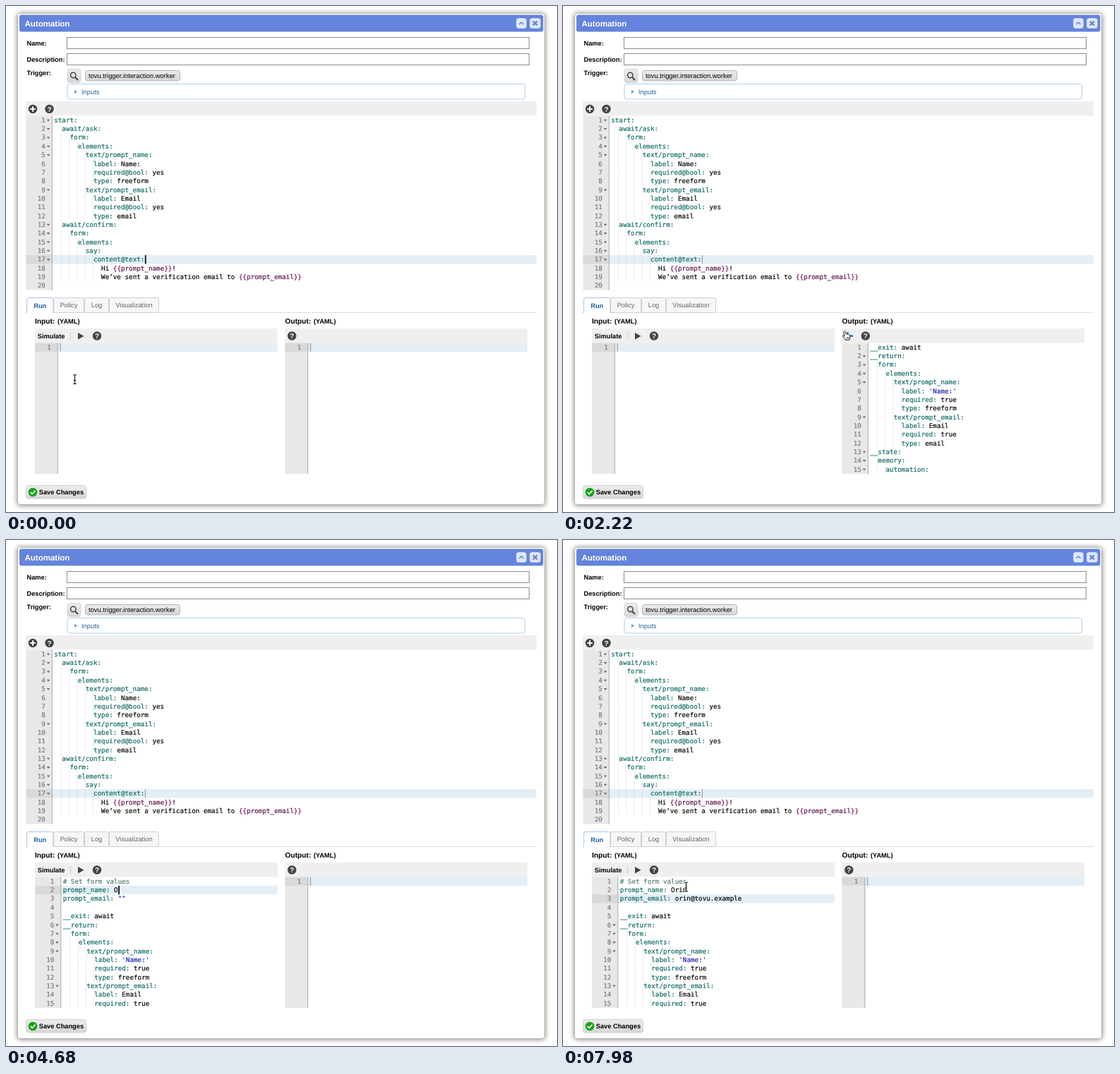
Write an HTML page that moves like this. It is 781 px wide and 717 px high and loops after 8000 ms.

```html
<!DOCTYPE html>
<html lang="en">
<head>
<meta charset="utf-8">
<title>Automation</title>
<style>
  html, body { margin: 0; width: 100%; height: 100%; overflow: hidden; background: #fff; }
  svg { display: block; width: 781px; height: 717px; }
  text { font: 9.4px "Liberation Sans", Arial, sans-serif; text-rendering: geometricPrecision; white-space: pre; }
  .b { font-weight: bold; font-size: 9.25px; }
  .code { font: 9.26px "DejaVu Sans Mono", monospace; }
  .code, .code tspan { fill: currentColor; stroke: currentColor; stroke-width: .16px; }
  .num { color: #777; text-anchor: end; }
  .key { color: #0b6962; }
  .str { color: #1a1ab0; }
  .brace { color: #7d1060; }
  .var { color: #5a0f48; }
  .note { color: #4c7f6c; }
</style>
</head>
<body>
<svg id="stage" viewBox="0 0 781 717">
  <defs>
    <filter id="shadow" x="-5%" y="-5%" width="110%" height="110%"><feGaussianBlur stdDeviation="3.6"/></filter>
    <linearGradient id="button" x2="0" y2="1"><stop stop-color="#ececec"/><stop offset="1" stop-color="#d6d6d6"/></linearGradient>
  </defs>
  <g id="chrome"></g>
  <g id="live"></g>
</svg>
<script>
const LOOP = 8000, CHAR = 5.575, ROW = 12.34;
const NAME = 'Orin', EMAIL = 'orin@tovu.example';
const INK = '#444', BLUE = '#1f6fd0';

const FORM = `form:
  elements:
    text/prompt_name:
      label: 'Name:'
      required: true
      type: freeform
    text/prompt_email:
      label: Email
      required: true
      type: email`.split('\n').map(line => '  ' + line);

const SCRIPT = `start:
  await/ask:
    form:
      elements:
        text/prompt_name:
          label: Name:
          required@bool: yes
          type: freeform
        text/prompt_email:
          label: Email
          required@bool: yes
          type: email
  await/confirm:
    form:
      elements:
        say:
          content@text:
            Hi {{prompt_name}}!
            We’ve sent a verification email to {{prompt_email}}
`.split('\n');

const RESULT = ['__exit: await', '__return:', ...FORM, '__state:', '  memory:', '    automation:'];

// Drawing helpers
const rect = (x, y, w, h, fill, more = '') =>
  `<rect x="${x}" y="${y}" width="${w}" height="${h}" fill="${fill}" ${more}/>`;
const box = (x, y, w, h, fill, stroke, r = 0) => rect(x, y, w, h, fill, `stroke="${stroke}" rx="${r}"`);
const path = (d, stroke, width = 1, fill = 'none') =>
  `<path d="${d}" stroke="${stroke}" stroke-width="${width}" fill="${fill}"/>`;
const text = (x, y, s, cls = '', more = '') => `<text x="${x}" y="${y}" class="${cls}" ${more}>${s}</text>`;
const span = (cls, s) => `<tspan class="${cls}">${s}</tspan>`;
const disc = (x, y, fill = INK, r = 6.2) => `<circle cx="${x}" cy="${y}" r="${r}" fill="${fill}"/>`;
const help = (x, y, fill) => disc(x, y, fill) +
  text(x, y + 3.6, '?', 'b', 'fill="#fff" text-anchor="middle" style="font-size:10px"');

function highlight(code) {
  if (code[0] === '#') return span('note', code);
  const pair = code.match(/^([\w\/@]+:)(.*)$/);
  if (!pair) return code.replace(/{{(.*?)}}/g, (_, name) => span('brace', '{{') + span('var', name) + span('brace', '}}'));
  return span('key', pair[1]) + (/^ ['"]/.test(pair[2]) ? span('str', pair[2]) : pair[2]);
}

// caret: {row, col, focused, visible}
function editor(x, y, w, h, lines, { active, caret, select } = {}) {
  const gutter = lines.length > 9 ? 36.8 : 32.3, codeX = x + gutter + 2.9;
  const top = row => y + (row - 1) * ROW;
  let out = rect(x, y, w, h, '#fff') + rect(x, y, gutter, h, '#e8e8e8');
  if (active) {
    out += rect(x, top(active), gutter, ROW, '#d9d9d9')
      + rect(x + gutter, top(active), w - gutter, ROW, '#e4eef6');
  }
  if (select) out += rect(codeX + select.col * CHAR, top(select.row), select.length * CHAR, ROW, '#b5d5ff');
  out += path(`M${x + gutter} ${y}v${h}`, '#a8a8a8');
  lines.forEach((line, i) => {
    const rowTop = top(i + 1), base = rowTop + 9.3;
    const indent = line.search(/\S|$/);
    for (let c = 2; c <= indent; c += 2) {
      out += `<path d="M${codeX + c * CHAR - .7} ${rowTop}v${ROW}" stroke="#ccc" stroke-width=".8" stroke-dasharray="1 1"/>`;
    }
    out += text(x + gutter - 9.5, base, i + 1, 'code num');
    if (/^\s*[\w\/@]+:$/.test(line)) out += path(`M${x + gutter - 7.6} ${rowTop + 5.2}h4.6l-2.3 2.8z`, 'none', 0, '#666');
    out += text(codeX + indent * CHAR, base, highlight(line.trim()), 'code');
  });
  if (caret && caret.visible !== false) {
    const cx = codeX + caret.col * CHAR + .5;
    out += caret.focused ? rect(cx, top(caret.row), 1.7, ROW, '#000')
      : rect(cx, top(caret.row) + .3, 1, ROW - .6, '#8e8e8e');
  }
  return out;
}

function chrome() {
  const tab = (x, w, label) => box(x, 413.5, w, 21, '#f6f6f6', '#cfcfcf', 2) +
    text(x + w / 2, 427, label, '', 'fill="#666" text-anchor="middle"');
  const paneTitle = (x, title, gap) => text(x, 450, title, 'b', 'style="font-size:10.2px"') + text(x + gap, 450, '(YAML)', 'b');
  return rect(0, 0, 781, 717, '#fff')
    + rect(15.5, 10, 749, 698, '#8a8a8a', 'rx="5" filter="url(#shadow)"')
    + rect(17, 11, 746, 695, '#fff', 'rx="4"')
    + rect(19, 12.5, 742.5, 24, '#6483dc', 'rx="3"')
    + text(26.5, 29, 'Automation', 'b', 'fill="#fff" style="font-size:11.5px"')
    + box(723.5, 17.5, 14, 14, '#dfe7fb', '#c3d0f4', 3) + path('M727.5 26l3-3 3 3', '#6483dc', 1.5)
    + box(742.5, 17.5, 15, 14, '#dfe7fb', '#c3d0f4', 3) + path('M747 21.5l6 6m0-6l-6 6', '#6483dc', 2.4)
    + text(29.5, 55.6, 'Name:', 'b') + box(86.5, 44.5, 655, 16, '#fff', '#8c8c8c')
    + text(29.5, 79, 'Description:', 'b') + box(86.5, 67.5, 655, 16, '#fff', '#8c8c8c')
    + text(29.5, 98, 'Trigger:', 'b')
    + box(87, 89.5, 19, 19, 'url(#button)', '#d5d5d5', 3)
    + `<circle cx="95.3" cy="98" r="3.7" fill="none" stroke="${INK}" stroke-width="1.5"/>` + path('M98 101l4 4', INK, 2.2)
    + box(112.5, 91.5, 134, 14.5, 'url(#button)', '#b4b4b4', 3)
    + text(117, 102, 'tovu.trigger.interaction.worker')
    + box(87, 110.5, 648.5, 21.5, '#fff', '#b3cde8', 3)
    + path('M97 119l4 2.5-4 2.5z', 'none', 0, '#6c97c8') + text(107, 124.5, 'Inputs', '', 'fill="#27609c"')
    + rect(28, 135, 724, 20.5, '#efefef')
    + disc(38, 146) + path('M38 142.3v7.4m-3.7-3.7h7.4', '#fff', 2) + help(61.5, 146)
    + path('M28 434.5H752', '#ddd')
    + tab(67.5, 43, 'Policy') + tab(111.5, 34, 'Log') + tab(146.5, 70, 'Visualization')
    + path('M29.5 435V416q0-2.5 2.5-2.5H64.5q2.5 0 2.5 2.5V435', '#a9c3e0', 1, '#fff')
    + text(48.2, 427.5, 'Run', 'b', 'fill="#1c5fa4" text-anchor="middle"')
    + paneTitle(41, 'Input:', 32) + paneTitle(395.5, 'Output:', 40.5)
    + rect(41, 457, 344, 20.7, '#efefef') + rect(395.5, 457, 343.5, 20.7, '#efefef')
    + text(44.8, 470.6, 'Simulate', 'b') + path('M91.5 462v11', '#ccc')
    + box(28.5, 679.5, 85, 18.5, 'url(#button)', '#d2d2d2', 3)
    + disc(38, 689, '#19a319', 6.3) + path('M34.8 689l2.4 2.6 4.2-4.8', '#fff', 1.7)
    + text(46.8, 692, 'Save Changes', 'b');
}

// Pointer: [time, x, y], eased between stops
const STOPS = [
  [0, 97.5, 529], [420, 97.5, 529], [960, 107, 466], [1260, 107, 466],
  [2040, 397, 460], [2220, 399.5, 461], [2400, 405, 465], [3060, 405, 465],
  [4020, 160, 499], [5080, 160, 499], [5300, 164, 508.5], [7440, 164, 508.5], [7920, 174.5, 491.5], [LOOP, 174.5, 491.5]
];

function pointerAt(t) {
  const i = STOPS.findIndex(s => s[0] > t);
  const [t0, x0, y0] = STOPS[i - 1], [t1, x1, y1] = STOPS[i];
  const k = (t - t0) / (t1 - t0), e = k * k * (3 - 2 * k);
  return { x: x0 + (x1 - x0) * e, y: y0 + (y1 - y0) * e };
}

const HAND = 'M-1 0Q.2-.8 1 .6L1.8 4.2Q3-.1 3.9 4.6Q5.1 3.6 5.9 5.2Q7.3 4.4 7.5 6.6Q7.7 9 6.3 12.2H.6Q-.6 9.8-3 7.3Q-3.8 5.7-2 5.9L-.4 7.3L-1.7 1.2Q-1.8 .2-1 0Z';
const ARROW = 'M0 0V11.5L2.7 9 4.5 13 6.3 12.2 4.5 8.3H8.2Z';
const BEAM = 'M-2.5-6.5Q0-6.5 0-5Q0-6.5 2.5-6.5M0-5V5M-2.5 6.5Q0 6.5 0 5Q0 6.5 2.5 6.5M-1.5 1.5h3';

function pointer({ x, y }, overIcon) {
  const inEditor = y > 477.7 && (x < 385 || x > 395);
  const shape = inEditor ? path(BEAM, '#fff', 2.6) + path(BEAM, '#111', 1.1)
    : overIcon ? path(HAND, '#111', .9, '#fff') + path('M2.2 8v2.7M4 8v2.7M5.6 8v2.7', '#111', .7)
    : path(ARROW, '#fff', 1, '#000');
  return `<g transform="translate(${x} ${y})">${shape}</g>`;
}

const typed = (t, start, step) => Math.max(0, Math.floor((t - start) / step) + 1);
const blink = (t, since) => (t - since) % 1000 < 500;

function live(t) {
  const at = pointerAt(t);
  const near = x => Math.abs(at.x - x) < 10 && at.y < 477;
  const ran = t >= 1200 && t < 2580, filled = t >= 2580;
  const running = t >= 1080 && t < 1200;

  const nameKeys = Math.min(NAME.length, typed(t, 4620, 120));
  const mailKeys = Math.min(4, typed(t, 5520, 110)) + Math.min(EMAIL.length - 4, typed(t, 6000, 85));
  const name = nameKeys ? NAME.slice(0, nameKeys) : '""';
  const mail = mailKeys ? EMAIL.slice(0, mailKeys) : '""';

  const script = { active: 17, caret: { row: 17, col: 23, focused: t < 1080, visible: t < 150 || t >= 650 } };
  const idle = { active: 1, caret: { row: 1, col: 0 } };
  const entry = {};
  if (t >= 5340) {
    entry.active = 3;
    entry.caret = { row: 3, col: 14 + (mailKeys || 2), focused: true, visible: t < 7020 || blink(t, 7020) && t < 7900 };
    if (!mailKeys && t >= 5420) entry.select = { row: 3, col: 14, length: 2 };
  } else if (t >= 4140) {
    entry.active = 2;
    entry.caret = { row: 2, col: 13 + (nameKeys ? name.length : 2), focused: true };
    if (!nameKeys && t >= 4320) entry.select = { row: 2, col: 13, length: 2 };
  }
  const request = ['# Set form values', `prompt_name: ${name}`, `prompt_email: ${mail}`, '', '__exit: await', '__return:', ...FORM.slice(0, 9)];

  const play = running ? '' : path('M102 463l8.5 4.7-8.5 4.7z', 'none', 0, near(106) ? BLUE : INK);
  const arrowInk = near(405) ? BLUE : INK;
  const outputTools = ran
    ? path('M411 467.5h-9', arrowInk, 2.4) + path('M404.5 462.5l-5 5 5 5', arrowInk, 2) + help(428.8, 467.5)
    : help(405.3, 467.5, near(405) ? BLUE : INK);
  const hidden = t >= 4620 && t < 5040 || t >= 5520 && t < 7440;

  return editor(28.5, 155.5, 723.5, 247, SCRIPT, script)
    + editor(41, 477.5, 344, 185.5, filled ? request : [''], filled ? entry : idle)
    + editor(395.5, 477.5, 343.5, 185.5, ran ? RESULT : [''], ran ? {} : idle)
    + play + help(running ? 128.2 : 129, 467.5) + outputTools
    + (hidden ? '' : pointer(at, near(106) || near(129) || near(405)));
}

const layer = document.getElementById('live');
document.getElementById('chrome').innerHTML = chrome();
const begin = performance.now();
function frame() {
  layer.innerHTML = live((performance.now() - begin) % LOOP);
  requestAnimationFrame(frame);
}
frame();
</script>
</body>
</html>
```
